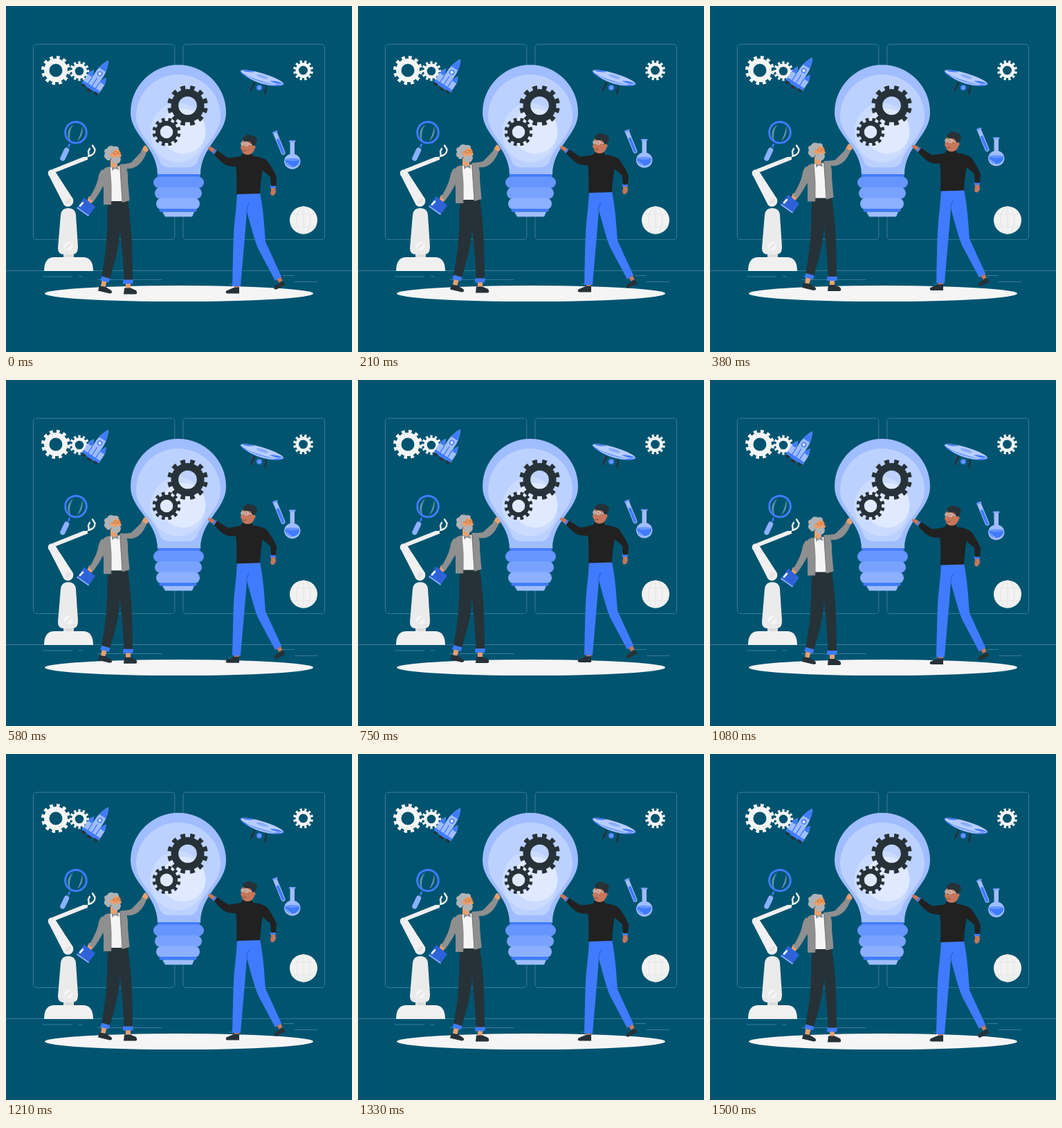
Animation, 500 px wide and 500 px high, one loop 1540 ms. Source, as an HTML page:

```html
<!DOCTYPE html>
<html lang="en">
<head>
<meta charset="utf-8">
<title>Big idea</title>
<style>
html, body { margin: 0; width: 100%; height: 100%; overflow: hidden; background: #005470; }
svg { display: block; width: 100vw; height: 100vh; }
.line { fill: none; stroke: #4b879a; stroke-width: .8; }
.blue { fill: #407bff; } .light { fill: #9fbdff; } .pale { fill: #f5f5f5; }
.mist { fill: #ebebeb; } .metal { fill: #f0f0f0; } .dark { fill: #263238; } .black { fill: #212121; }
.grey { fill: #8f8f8f; } .hair { fill: #b0b3b5; } .skin { fill: #e9a06f; } .tan { fill: #c6775b; }
.stroke { fill: none; stroke-linecap: round; stroke-linejoin: round; }
</style>
</head>
<body>
<svg viewBox="0 0 500 500">
  <g class="line">
    <rect x="39.5" y="55.3" width="204.3" height="282.300" rx="4.500"/>
    <rect x="256" y="55.3" width="204.500" height="282.300" rx="4.500"/>
    <path d="M0 382.500H500M53 391H96M105 391H111M132 395.500H225M400 389.500H416M417 398.500H450M322 402H338"/>
  </g>
  <ellipse class="pale" cx="250" cy="415.600" rx="194" ry="11.500"/>

  <g id="paleGears"></g>

  <!-- magnifier -->
  <path d="M92 199L90 204" stroke="#407bff" stroke-width="2.500"/>
  <path class="stroke" d="M87.500 208.500L82 220" stroke="#8cafff" stroke-width="7.500"/>
  <circle cx="101" cy="182.700" r="15.300" fill="none" stroke="#407bff" stroke-width="3"/>
  <path d="M97 171Q84 183 93 195Q90 183 97 171ZM110 173Q113 187 103 195Q109 184 110 173Z" fill="#ffffff60"/>

  <!-- robot arm -->
  <path class="metal" d="M55 383Q55 363 70 363H111Q126 363 126 383Z"/>
  <path fill="#dcdcdc" d="M83 357H98V363H83Z"/>
  <path class="mist" d="M79 302Q80 292 90 292Q100 292 101 302L104 348Q104 359 96 359H84Q75 359 75 350Z"/>
  <path class="metal" d="M61 243L71 239L97 279Q99 288 90 290Q84 290 82 284Z"/>
  <path class="metal" d="M67 236L112 218L118 218L118 222L70 241Z"/>
  <circle class="metal" cx="66" cy="241.500" r="5.300"/>
  <circle class="mist" cx="90" cy="282" r="5"/>
  <circle class="pale" cx="90" cy="347" r="6.300"/>
  <path d="M86 351L94 343M87 285L93 279" stroke="#d8d8d8" stroke-width="1.200"/>
  <path class="stroke" d="M120 217L119 210L121 206M119 217Q129 215 128.500 207L125 201.500" stroke="#f0f0f0" stroke-width="2.400"/>

  <!-- globe -->
  <circle cx="430" cy="309.500" r="20" fill="#f2f2f2"/>
  <g fill="none" stroke="#e0e0e0" stroke-width=".8">
    <ellipse cx="430" cy="309.500" rx="10" ry="20"/>
    <path d="M430 289.500V329.500M412 301H448M412 319H448"/>
  </g>

  <!-- drone -->
  <path class="stroke" d="M359 111L354 122M376 116L374.500 127" stroke="#263238" stroke-width="2.600"/>
  <circle cx="366" cy="118" r="3.300" fill="#6c98ff" stroke="#407bff" stroke-width="1.500"/>
  <g transform="rotate(17 370 103.500)">
    <path class="blue" d="M336.500 103Q370 92 403.500 103Q402 108 385 111H357Q339 108 336.500 103Z"/>
    <ellipse cx="370" cy="103" rx="32" ry="5.500" fill="#b7ceff"/>
    <path class="light" d="M346 107Q370 112 394 107Q386 112 370 112Q354 112 346 107Z"/>
    <path class="blue" d="M338 102Q346 98 357 98.500Q349 103 338 102ZM402 103Q393 107 382 105Q391 101 402 103Z"/>
    <ellipse cx="370" cy="102" rx="9" ry="2.300" fill="#8cafff"/>
  </g>

  <!-- light bulb -->
  <path class="light" d="M180 154A69 69 0 0 1 318 154C318 187 281 203 281 244H219C219 203 180 187 180 154Z"/>
  <path fill="#bcd1ff" d="M188 159A61 60 0 0 1 310 159C310 185 285 200 276 226Q272 233 264 233H235Q227 233 223 226C214 200 188 185 188 159Z"/>
  <ellipse cx="248.500" cy="183" rx="40" ry="43" fill="#cbdbff"/>
  <circle cx="256" cy="181" r="32.500" fill="#dfe9ff"/>
  <rect class="blue" x="219" y="243" width="61" height="8"/>
  <rect x="213" y="246.500" width="73" height="17" rx="8.500" fill="#6695ff"/>
  <rect x="215" y="262" width="68" height="17" rx="8.500" fill="#79a2ff"/>
  <rect x="217" y="277.500" width="63" height="16.500" rx="8" fill="#8cafff"/>
  <rect class="blue" x="221.500" y="293" width="54" height="4.500" rx="2"/>
  <path class="light" d="M226 297.500H272L269 304.500H230Z"/>
  <g id="darkGears"></g>

  <g id="floating">
    <!-- rocket -->
    <g transform="translate(122 119) rotate(33)">
      <path class="dark" d="M-4 0H4L3 5H-3ZM-13 -1H-8V4H-13ZM8 -1H13V4H8Z"/>
      <path class="light" d="M-6.500 1V-27Q-5 -40 0 -48Q5 -40 6.500 -27V1Z"/>
      <path class="blue" d="M-5.800 -32Q-4 -41 0 -48Q4 -41 5.800 -32ZM-6.500 -4H6.500V1H-6.500Z"/>
      <g id="booster">
        <path class="light" d="M-14.500 0V-15Q-13.500 -21 -10.500 -25Q-7.500 -21 -6.500 -15V0Z"/>
        <path class="blue" d="M-14.500 -15Q-13.500 -21 -10.500 -25Q-7.500 -21 -6.500 -15ZM-14.500 -4H-6.500V0H-14.500Z"/>
      </g>
      <use href="#booster" x="21" y="0"/>
      <circle cx="0" cy="-25" r="3" fill="#dfe9ff" stroke="#407bff" stroke-width="1.500"/>
      <path d="M0 -18V-1M-6.500 -15V0M6.500 -15V0" stroke="#407bff" stroke-width="1.300"/>
    </g>

    <!-- lab glass -->
    <path class="stroke" d="M389 184L400.500 212" stroke="#9fbdff" stroke-width="6"/>
    <path class="stroke" d="M393 194L400.500 212" stroke="#407bff" stroke-width="4"/>
    <path class="stroke" d="M386 183.500L391.500 181.300" stroke="#6695ff" stroke-width="2.300"/>
    <g transform="translate(0 -1)">
      <path class="light" d="M410.500 197H417V215A11.700 11.200 0 1 1 410.500 215Z"/>
      <path class="blue" d="M403.500 223H424A10.300 10 0 1 1 403.500 223Z"/>
      <ellipse cx="413.700" cy="223" rx="10.200" ry="2" fill="#6695ff"/>
      <path class="stroke" d="M410 196.500H417.500" stroke="#7fa6ff" stroke-width="2.300"/>
      <path class="stroke" d="M406 228Q408 232 412 233" stroke="#bcd1ff" stroke-width="1"/>
    </g>

    <!-- older man -->
    <g>
      <path class="skin" d="M139 395L146 397L143 407L137 405ZM173 399H180V409H173Z"/>
      <path class="dark" d="M135 404.500L144 406L152 411Q155 415 150 415.500L133 411.500ZM171 407.500H180L188 411Q191 416 187 416.500H170Z"/>
      <path class="dark" d="M148 280H176C179 305 183 330 183 397H170.500C170 365 167 350 165 322C163 352 157 370 150 395L138 391.500C144 360 147 330 146 304Z"/>
      <path class="blue" d="M138.500 390.500L150.500 394L148.500 399.500L136 396.500ZM169.500 395.500H184L183 401.500H169Z"/>
      <path class="pale" d="M150 233L166 231L169 282H150Z"/>
      <path class="skin" d="M151 222H161V233L156 235L151 232Z"/>
      <g id="oldArm">
        <path class="skin" d="M195 211L199 203Q202 200 203 203L205 206Q207 209 203 211L200 214Z"/>
        <path class="grey" d="M164 229Q177 228 181 226L198 208L203 212Q196 229 186 233Q180 236 170 235Z"/>
      </g>
      <path class="grey" d="M150 232Q140 233 138 242Q138 250 141 264V287H152V260ZM164 230L172 229Q177 238 176 252L178.500 281L168 284Z"/>
      <path d="M150 232L152 258V287M165 231L168 284" fill="none" stroke="#707070" stroke-width=".8"/>
      <path d="M153 232L157 234L162 231L163 237L157.500 235L153 238Z" fill="#8d9396"/>
      <path class="skin" d="M120 275L127 277Q126 284 121 287L116 285Z"/>
      <path class="grey" d="M139 236L145 246Q143 260 126 283L120 278Q130 262 133 250Q134 241 139 236Z"/>
      <path d="M113 277L129 290L119 304L102 292Z" fill="#2e62d9"/>
      <path d="M102 292L119 304L120 302.500L103 290.500Z" fill="#8cafff"/>
      <path class="stroke" d="M107 289L111 284.500" stroke="#fff" stroke-width="2.600"/>
      <path class="skin" d="M151 207Q164 203 165 212L167 217L163 220L152 221Z"/>
      <path class="hair" d="M163 207Q154 207 154 213L151 222Q146 225 145 221Q140 218 143 213Q140 207 146 206Q149 200 156 203Q163 202 163 207Z"/>
      <path class="hair" d="M152 218Q157 220 159 218Q164 217 166 220Q166 227 160 228Q152 228 152 218Z"/>
      <circle class="skin" cx="152.500" cy="215" r="2.300"/>
      <g fill="none" stroke="#d2691e" stroke-width=".8">
        <circle cx="158.300" cy="212.500" r="2.500"/><circle cx="163.700" cy="212" r="1.900"/>
        <path d="M152.500 213H156"/>
      </g>
    </g>

    <!-- younger man -->
    <g>
      <path class="tan" d="M330 402H337V408H330ZM390 393L396 389L400 398L395 400Z"/>
      <path class="dark" d="M337 406.500L329 407L318.500 411.500Q316 415.500 321 415.500H337ZM399 397L404 403L391 409.500Q386 410.500 388 405.500Z"/>
      <path class="blue" d="M334 270H367C372 295 373 315 375 341L398 391L389 397L364 350C358 335 354 318 348 297C346 325 342 370 339 405H327C328 370 328 340 330 315Q333 290 334 270Z"/>
      <path class="stroke" d="M348 299Q347 292 351 286" stroke="#2c5fd3" stroke-width="1.200"/>
      <g id="youngArm">
        <path class="tan" d="M301 214L295 209Q290 205 293 204Q296 203 299 205L305 210Z"/>
        <path d="M299 213L304 208" stroke="#407bff" stroke-width="2.500"/>
        <path class="black" d="M301 214L305 208.500Q314 215 321 219.500Q331 219 341 217L343 232Q328 233 318 230Q308 224 301 214Z"/>
      </g>
      <path class="tan" d="M383 262H389L390 268Q389 274 384 274Q381 271 383 267Z"/>
      <path class="blue" d="M382 259H390V263H382Z"/>
      <path class="black" d="M366 219Q377 220 381 229Q388 239 391 248L390 260H383L382 247L368 235Z"/>
      <path class="black" d="M335 219Q341 218 342 212H355L357 217Q369 217 374 224Q368 245 367 271L333 272Q334 245 332 229Z"/>
      <path class="tan" d="M341 195Q348 190 357 195L359 207Q357 214 350 215Q342 215 341 209L339 205Z"/>
      <path class="dark" d="M343 195Q341 189 346 188Q349 184 354 187Q362 188 363 194Q362 199 358 203L355 201Q355 196 350 196Q346 196 343 195Z"/>
      <circle class="tan" cx="358" cy="204" r="2.500"/>
      <path d="M349 199L356 201" stroke="#dfe9ff" stroke-width=".8"/>
      <g fill="#ffffff30" stroke="#bfe0e6" stroke-width=".9"><circle cx="347.500" cy="199.500" r="2.700"/><circle cx="341.500" cy="199" r="1.900"/></g>
      <path class="stroke" d="M342.500 209Q345 211 347 209" stroke="#7d3f31" stroke-width=".9"/>
    </g>
  </g>
</svg>
<script>
const $ = id => document.getElementById(id);
const TEETH = 12;

// A ring plus a dashed ring whose dashes form the teeth.
function gear(x, y, tip, body, hole, angle, color) {
  const ring = (inner, outer, extra = '') =>
    `<circle cx="${x}" cy="${y}" r="${(inner + outer) / 2}" fill="none" stroke="${color}"
      stroke-width="${outer - inner}" ${extra}/>`;
  return ring(hole, body) +
    ring(body - 1, tip, `pathLength="${TEETH * 2}" stroke-dasharray="1" stroke-dashoffset=".5"
      transform="rotate(${angle} ${x} ${y})"`);
}
$('paleGears').innerHTML =
  gear(72, 93, 21, 17, 9.5, 10, '#f5f5f5') +
  gear(106, 94, 14.3, 10.8, 6.3, 0, '#f5f5f5') +
  gear(429.5, 93, 14.5, 11, 6.5, 15, '#f5f5f5');
$('darkGears').innerHTML =
  gear(262.5, 144, 29.3, 24, 13.3, 15, '#263238') +
  gear(232, 182, 20.5, 16, 9.3, 15, '#263238');

const LOOP = 1540, STEPS = 37, RISE = 7.6;

function skewFrom(id, x, degrees) {
  $(id).setAttribute('transform', `translate(${x}) skewY(${degrees}) translate(${-x})`);
}

function draw(now) {
  const step = Math.floor(now % LOOP / LOOP * STEPS);
  const lift = (1 - Math.cos(2 * Math.PI * (step + 1.5) / STEPS)) / 2;
  $('floating').setAttribute('transform', `translate(0 ${-RISE * lift})`);
  // The hands stay close to the bulb while the bodies rise.
  skewFrom('oldArm', 170, 7 * lift);
  skewFrom('youngArm', 338, -4 * lift);
  requestAnimationFrame(draw);
}
draw(0);
</script>
</body>
</html>
```
